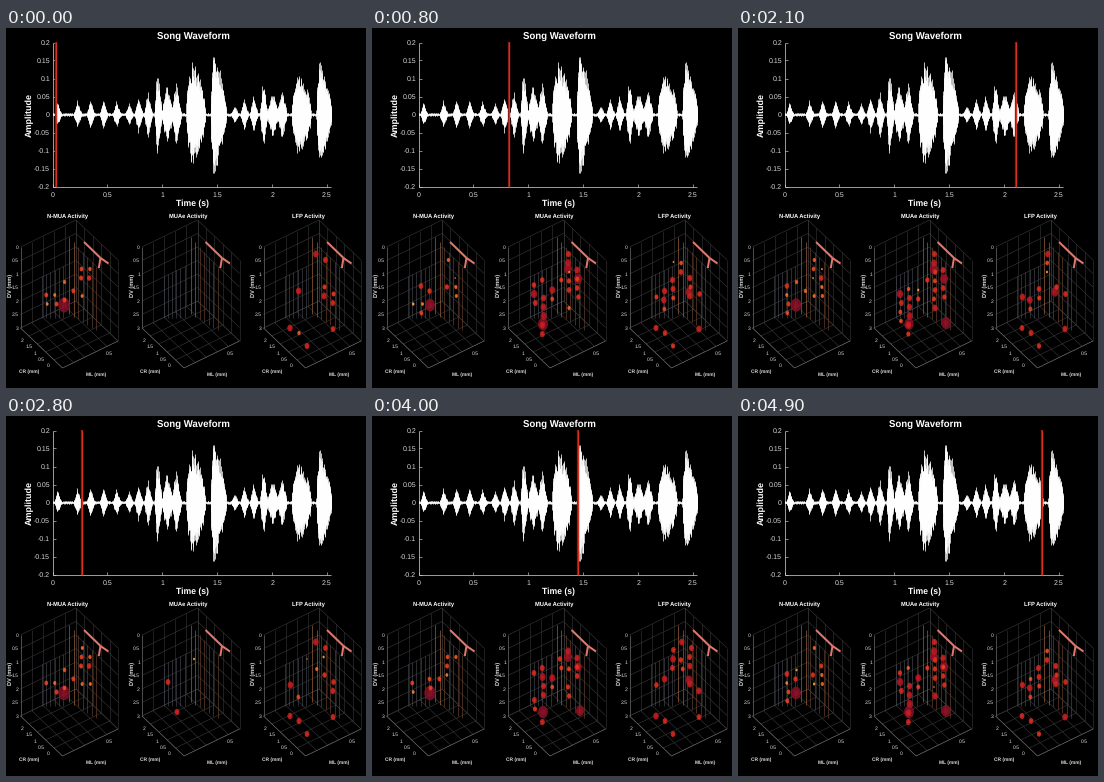
Write a matplotlib script that moves like this. It is 360 by 360 pixels and loops after 5 s.

```python
import numpy as np
import matplotlib.pyplot as plt
from matplotlib.animation import FuncAnimation
from matplotlib.colors import LinearSegmentedColormap
from matplotlib.patches import Ellipse

SIZE, DPI, FRAMES, INTERVAL = 360, 100, 50, 100
PT = 72 / DPI
SONG = 2.53            # seconds of song before the cursor wraps
START, STEP = 0.03, 0.0988
X0, X_SCALE = 46.5, 109.8
Y0, Y_SCALE = 86.5, 360
PANEL_STEP = 121.5

plt.rcParams["font.family"] = "Liberation Sans"
plt.rcParams["text.hinting"] = "no_hinting"
fig = plt.figure(figsize=(SIZE / DPI, SIZE / DPI), dpi=DPI, facecolor="black")
ax = fig.add_axes([0, 0, 1, 1])
ax.set(xlim=(0, SIZE), ylim=(SIZE, 0))
ax.axis("off")


def text(x, y, label, px, bold=False, color="white", ha="center", rotation=0):
    ax.text(x, y, label, fontsize=px * PT, color=color, ha=ha,
            va="center" if rotation else "center_baseline", rotation=rotation,
            weight="bold" if bold else "normal")


def line(p, q, color, px=0.6, z=1):
    return ax.plot([p[0], q[0]], [p[1], q[1]], color=color, lw=px * PT,
                   zorder=z, solid_capstyle="butt")[0]


def smooth(u):
    u = np.clip(u, 0, 1)
    return u * u * (3 - 2 * u)


# One motif, sung twice: centre, left width, right width, amplitude, edge power
MOTIF = [
    (122.5, 4, 5, 12, 1.2), (132, 4, 5, 21, 1.2), (141.5, 4, 5, 24, 1.1),
    (151, 3, 5, 46, 1), (160.5, 5, 6, 30, .7), (170, 5, 5, 32, .8),
    (186, 6, 13, 54, .45), (207, 2.5, 13, 68, .6),
]
MOTIF_PERIOD, REPEAT_GAIN = 105.7, 0.8


def syllables():
    yield 51, 3, 5, 13, 1.2
    for i in range(4):
        yield 71 + 13 * i, 4, 5, 15, 1.2
    for x, left, right, amp, power in MOTIF:
        yield x, left, right, amp, power
        yield x + MOTIF_PERIOD, left, right, amp * REPEAT_GAIN, power


def draw_waveform():
    rng = np.random.default_rng(4)
    x = np.arange(X0, 325.5, 0.25)
    envelope = np.full_like(x, 1.2)
    for centre, left, right, amp, power in syllables():
        d = x - centre
        near = np.clip(1 - np.abs(d) / np.where(d < 0, left, right), 0, 1)
        envelope = np.maximum(envelope, amp * near ** power)
    up, down = 0.6 + 0.4 * rng.random((2, x.size)) ** 1.5
    ax.vlines(x, Y0 - envelope * up, Y0 + envelope * down * 0.95,
              color="white", lw=0.75 * PT, zorder=2)


def draw_song_axes():
    axis = "#d8d8d8"
    line((X0, 14.5), (X0, 158.5), axis, 0.7)
    line((X0, 158.5), (325, 158.5), axis, 0.7)
    for i in range(-4, 5):
        y = Y0 - i * 0.05 * Y_SCALE
        line((X0, y), (X0 + 3, y), axis)
        text(44, y, f"{i * 0.05:.2g}" if i else "0", 7, color=axis, ha="right")
    for i in range(6):
        x = X0 + i / 2 * X_SCALE
        line((x, 158.5), (x, 155.5), axis)
        text(x, 166, f"{i / 2:g}", 7, color=axis)
    text(187, 7, "Song Waveform", 9.7, True)
    text(24, 87, "Amplitude", 9, True, rotation=90)
    text(186.5, 175, "Time (s)", 8.7, True)


# Corners of the box floor; LIFT reaches the top of the walls
LEFT, BACK, RIGHT, FRONT = map(np.array, ((14.5, 300), (70, 273), (112, 313), (56.5, 340)))
LIFT = np.array([0, -81])


def draw_panel(index, title):
    shift = np.array([index * PANEL_STEP, 0])
    grid, edge, label = "#3a3a3a", "#707070", "#dddddd"

    def seg(p, q, color=grid, px=0.55, z=1):
        line(p + shift, q + shift, color, px, z)

    for k in np.linspace(0, 1, 7):
        seg(LEFT + LIFT * k, BACK + LIFT * k)
        seg(BACK + LIFT * k, RIGHT + LIFT * k)
    for start, end, across in ((LEFT, BACK, FRONT - LEFT), (BACK, RIGHT, LEFT - BACK)):
        for k in np.linspace(0, 1, 6):
            p = start + k * (end - start)
            seg(p, p + LIFT)
            seg(p, p + across)
    for p, q in ((LEFT, LEFT + LIFT), (LEFT, FRONT), (FRONT, RIGHT)):
        seg(p, q, edge)

    # Electrode shanks
    for x in np.linspace(36, 57, 6):
        seg(np.array([x, 248 - 0.5 * (x - 36)]), np.array([x, 290]), "#484a54", 0.6, 3)
    for x in np.linspace(63, 90, 7):
        color = "#925f3c" if x < 72 else "#5e3c2c"
        seg(np.array([x, 209 + 1.1 * (x - 63)]), np.array([x, 286 + 0.6 * (x - 63)]), color, 0.7, 3)

    fork = np.array([94.5, 230])
    for end in ((78, 214), (102.5, 235.5), (92.8, 240)):
        seg(np.array(end), fork, "#e0786c", 2, 4)

    dx = shift[0]
    for i in range(7):
        text(12.5 + dx, 219 + 13.5 * i, f"{i / 2:g}", 5, color=label, ha="right")
    for i in range(5):
        text(16.5 + 6.3 * i + dx, 312.5 + 6.1 * i, f"{2 - i / 2:g}", 5, color=label)
    text(103 + dx, 325, "0.5", 5, color=label)
    text(4.5 + dx, 257, "DV (mm)", 5.6, True, label, rotation=90)
    text(23 + dx, 343.5, "CR (mm)", 4.9, True, label)
    text(90 + dx, 346, "ML (mm)", 4.9, True, label)
    text(62 + 120.2 * index, 187.7, title, 5.8, True)


# Per panel: depth range on each probe, strong sites (x, y, radius),
# usual radius, bias towards being active, range of onset times
PROBE_X, PROBE_STEP, DEPTH_STEP = 41, 8.6, 9
PANELS = {
    "N-MUA Activity": (
        [(267, 276), (258, 290), (254, 273), (263, 263), (232, 268), (241, 273)],
        [(58, 277, 6)], 1.9, 0.2, (-1, 0)),
    "MUAe Activity": (
        [(257, 298), (252, 306), (262, 271), (243, 255), (226, 281), (242, 270)],
        [(49.5, 296, 5.4), (86.5, 295, 4.8), (74.5, 241, 4.5), (84.5, 251, 4.3)],
        2.6, 0.75, (0.2, 0.9)),
    "LFP Activity": (
        [(269, 269), (263, 281), (234, 276), (226, 255), (232, 276), (266, 276)],
        [(74, 264, 3.9), (41, 300, 2.9), (50, 305, 2.6), (58, 318, 2.5), (84, 301, 2.8)],
        2.4, 0.4, (-0.6, 0.6)),
}
HEAT = LinearSegmentedColormap.from_list(
    "heat", ["#ffa546", "#f8762d", "#e8341e", "#b91822", "#911224", "#801028"])


def make_bubble(x, y, radius, bias, onset, phase):
    z = 6 - radius / 10
    body, core = (ax.add_patch(Ellipse((x, y), 0, 0, alpha=alpha, lw=0, zorder=z + dz))
                  for alpha, dz in ((0.85, 0), (0.3, 0.01)))
    return radius, bias, onset, phase, body, core


def make_bubbles():
    rng = np.random.default_rng(11)
    for index, (depths, strong, size, bias, onsets) in enumerate(PANELS.values()):
        sites = [(x, y, radius, 1.3) for x, y, radius in strong]
        for probe, (top, bottom) in enumerate(depths):
            for y in np.arange(top, bottom + 1, DEPTH_STEP):
                x = PROBE_X + PROBE_STEP * probe + rng.uniform(-1, 1)
                sites.append((x, y, size * rng.uniform(0.8, 1.3), bias))
        for x, y, radius, site_bias in sites:
            yield make_bubble(x + index * PANEL_STEP, y, radius, site_bias,
                              rng.uniform(*onsets), rng.uniform(0, 2 * np.pi))


def update(frame):
    t = (START + STEP * frame) % SONG
    x = X0 + X_SCALE * t
    for part in cursor:
        part.set_xdata([x, x])
    for size, bias, onset, phase, body, core in bubbles:
        wave = np.sin(4 * t + phase)
        level = smooth((wave + bias) / 0.4 + 0.5) * smooth((t - onset) / 0.15 + 0.5)
        radius = size * level * (1 + 0.08 * wave)
        visible = radius > 0.6
        color = HEAT(np.sqrt(np.clip((radius - 1.5) / 5, 0, 1)))
        body.set(width=1.8 * radius, height=2.3 * radius, facecolor=color, visible=visible)
        core.set(width=0.9 * radius, height=1.2 * radius, visible=visible,
                 facecolor=np.minimum(1, np.array(color[:3]) * 1.25))


draw_song_axes()
draw_waveform()
for index, title in enumerate(PANELS):
    draw_panel(index, title)
bubbles = list(make_bubbles())
cursor = [line((X0, 14), (X0, 158.5), "#8c1a14", 2.3, 7),
          line((X0, 14), (X0, 158.5), "#d83020", 1.2, 8)]

animation = FuncAnimation(fig, update, frames=FRAMES, interval=INTERVAL,
                          repeat=True, repeat_delay=0, blit=False)
plt.show()
```
